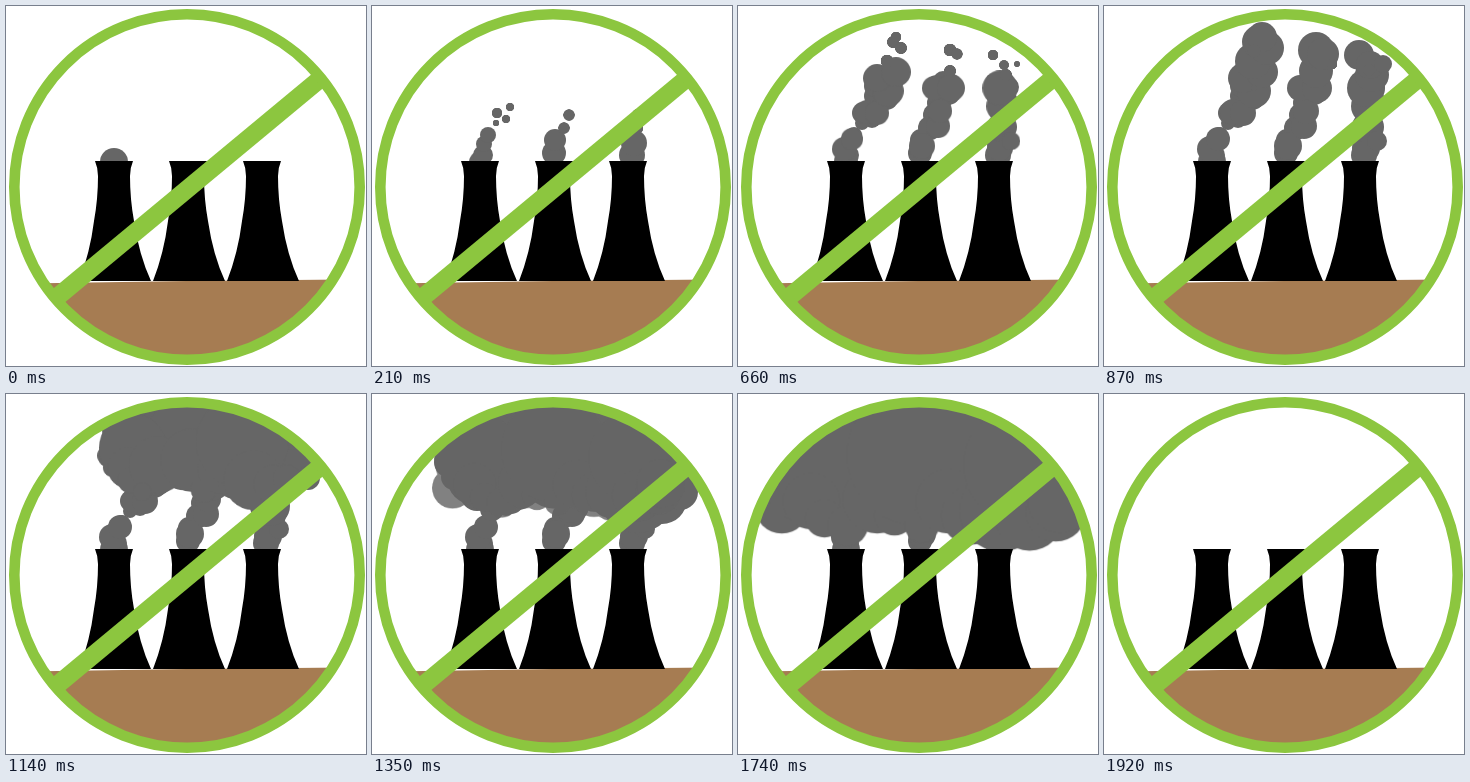
These frames come from a looping animation (360x360 px, 1.95 s). An HTML page without scripts:

```html
<!DOCTYPE html>
<html lang="en">
<head>
<meta charset="utf-8">
<title>No smoke</title>
<style>
  html, body { margin: 0; width: 100%; height: 100%; overflow: hidden; background: #fff; }
  svg { display: block; width: 100vw; height: 100vh; }
  .smoke { fill: #666; animation: clear 1.95s step-end infinite; }
  .smoke circle { transform-box: fill-box; transform-origin: center; }
  .puff { animation: puff 1.95s linear infinite; }
  .a circle { animation: a 1.95s linear infinite; }
  .b circle { animation: b 1.95s linear infinite; }
  .c circle { animation: c 1.95s linear infinite; }
  .d circle { animation: d 1.95s linear infinite; }
  .e circle { animation: e 1.95s linear infinite; }
  .f circle { animation: f 1.95s linear infinite; }
  .g circle { animation: g 1.95s linear infinite; }
  .spread, .fill { transform-origin: 190px 40px; }
  .spread { animation: spread 1.95s linear infinite; }
  .fill { animation: fill 1.95s linear infinite; }

  @keyframes clear { 0% { opacity: 1 } 98.4%, 100% { opacity: 0 } }
  @keyframes puff { 0% { transform: scale(1) } 12%, 23% { transform: scale(.75) } 45%, 100% { transform: scale(1) } }

  /* plumes rise: low, middle, top, then swell */
  @keyframes a { 0%, 1% { transform: scale(0) } 9%, 100% { transform: scale(1) } }
  @keyframes b { 0%, 6% { transform: scale(0) } 16%, 100% { transform: scale(1) } }
  @keyframes c { 0%, 13% { transform: scale(0) } 23%, 100% { transform: scale(1) } }
  @keyframes d { 0%, 20% { transform: scale(0) } 35%, 100% { transform: scale(1) } }
  @keyframes e { 0%, 28% { transform: scale(0) } 44.6%, 100% { transform: scale(1) } }

  /* plumes merge into a cloud */
  @keyframes f { 0%, 43% { transform: scale(0) } 54%, 100% { transform: scale(1) } }
  @keyframes g { 0%, 46% { transform: scale(0) } 58.4%, 100% { transform: scale(1) } }

  /* cloud spreads outward */
  @keyframes spread {
    0%, 58.4% { transform: scale(.77); opacity: 0 }
    58.5% { transform: scale(.77); opacity: 1 }
    69.2%, 100% { transform: scale(1); opacity: 1 }
  }
  @keyframes fill {
    0%, 69.2% { transform: scale(.76); opacity: 0 }
    69.3% { transform: scale(.76); opacity: 1 }
    81.5% { transform: scale(1); opacity: 1 }
    87.7%, 100% { transform: scale(1.015); opacity: 1 }
  }
</style>
</head>
<body>
<svg viewBox="0 0 360 360">
  <defs>
    <clipPath id="inside"><circle cx="181" cy="181" r="171"/></clipPath>
    <path id="tower" d="M89 155H127Q124 162 124 170Q124 193 128 215Q133 249 145 275H73Q84 247 88 215Q92 193 92 170Q92 162 89 155Z"/>
  </defs>

  <g clip-path="url(#inside)">
    <g class="smoke">
      <circle class="puff" cx="108" cy="156" r="14"/>
      <g class="a">
        <circle cx="111" cy="149" r="10"/>
        <circle cx="112" cy="138" r="8"/>
        <circle cx="116" cy="129" r="8"/>
        <circle cx="182" cy="147" r="12"/>
        <circle cx="183" cy="134" r="11"/>
        <circle cx="260" cy="149" r="13"/>
        <circle cx="262" cy="137" r="13"/>
      </g>
      <g class="b">
        <circle cx="125" cy="107" r="11"/>
        <circle cx="134" cy="113" r="9"/>
        <circle cx="124" cy="117" r="7"/>
        <circle cx="138" cy="101" r="9"/>
        <circle cx="192" cy="122" r="12"/>
        <circle cx="197" cy="109" r="12"/>
        <circle cx="265" cy="122" r="13"/>
        <circle cx="266" cy="109" r="13"/>
      </g>
      <g class="c">
        <circle cx="137" cy="90" r="11"/>
        <circle cx="137" cy="80" r="11"/>
        <circle cx="148" cy="91" r="13"/>
        <circle cx="154" cy="76" r="11"/>
        <circle cx="201" cy="97" r="12"/>
        <circle cx="210" cy="86" r="13"/>
        <circle cx="198" cy="78" r="9"/>
        <circle cx="205" cy="75" r="10"/>
        <circle cx="265" cy="96" r="14"/>
        <circle cx="257" cy="80" r="8"/>
        <circle cx="271" cy="81" r="10"/>
      </g>
      <g class="d">
        <circle cx="106" cy="143" r="13"/>
        <circle cx="114" cy="133" r="12"/>
        <circle cx="129" cy="106" r="13"/>
        <circle cx="139" cy="107" r="13"/>
        <circle cx="150" cy="85" r="17"/>
        <circle cx="139" cy="72" r="15"/>
        <circle cx="158" cy="66" r="16"/>
        <circle cx="184" cy="140" r="14"/>
        <circle cx="200" cy="120" r="13"/>
        <circle cx="202" cy="105" r="13"/>
        <circle cx="196" cy="82" r="13"/>
        <circle cx="213" cy="82" r="15"/>
        <circle cx="262" cy="142" r="14"/>
        <circle cx="264" cy="121" r="16"/>
        <circle cx="273" cy="135" r="10"/>
        <circle cx="265" cy="100" r="18"/>
        <circle cx="262" cy="82" r="19"/>
      </g>
      <g class="e">
        <circle cx="149" cy="55" r="18"/>
        <circle cx="155" cy="36" r="17"/>
        <circle cx="163" cy="42" r="17"/>
        <circle cx="158" cy="31" r="15"/>
        <circle cx="212" cy="65" r="17"/>
        <circle cx="212" cy="44" r="18"/>
        <circle cx="219" cy="48" r="16"/>
        <circle cx="268" cy="69" r="17"/>
        <circle cx="255" cy="49" r="15"/>
        <circle cx="266" cy="59" r="14"/>
        <circle cx="279" cy="58" r="9"/>
      </g>
      <g class="f">
        <circle cx="150" cy="45" r="43"/>
        <circle cx="150" cy="82" r="19"/>
        <circle cx="205" cy="86" r="21"/>
        <circle cx="228" cy="58" r="35"/>
        <circle cx="265" cy="64" r="39"/>
        <circle cx="264" cy="112" r="20"/>
      </g>
      <g class="g">
        <circle cx="120" cy="36" r="24"/>
        <circle cx="122" cy="59" r="20"/>
        <circle cx="185" cy="49" r="47"/>
        <circle cx="175" cy="81" r="15"/>
        <circle cx="250" cy="35" r="38"/>
        <circle cx="288" cy="76" r="21"/>
        <circle cx="302" cy="84" r="12"/>
      </g>
      <g class="spread">
        <circle cx="78" cy="68" r="16"/>
        <circle cx="82" cy="83" r="13"/>
        <circle cx="108" cy="58" r="44"/>
        <circle cx="102" cy="84" r="27"/>
        <circle cx="105" cy="100" r="17"/>
        <circle cx="140" cy="80" r="37"/>
        <circle cx="120" cy="115" r="12"/>
        <circle cx="185" cy="74" r="41"/>
        <circle cx="200" cy="112" r="17"/>
        <circle cx="225" cy="85" r="33"/>
        <circle cx="238" cy="105" r="19"/>
        <circle cx="250" cy="50" r="60"/>
        <circle cx="265" cy="100" r="39"/>
        <circle cx="290" cy="105" r="25"/>
        <circle cx="308" cy="98" r="18"/>
      </g>
      <g class="fill">
        <circle cx="46" cy="111" r="27"/>
        <circle cx="80" cy="72" r="58"/>
        <circle cx="75" cy="106" r="28"/>
        <circle cx="88" cy="123" r="19"/>
        <circle cx="111" cy="130" r="20"/>
        <circle cx="140" cy="104" r="34"/>
        <circle cx="157" cy="120" r="20"/>
        <circle cx="180" cy="60" r="70"/>
        <circle cx="184" cy="130" r="17"/>
        <circle cx="210" cy="106" r="32"/>
        <circle cx="232" cy="120" r="29"/>
        <circle cx="262" cy="115" r="41"/>
        <circle cx="285" cy="70" r="60"/>
        <circle cx="290" cy="121" r="34"/>
        <circle cx="316" cy="116" r="30"/>
        <circle cx="320" cy="105" r="32"/>
      </g>
    </g>
    <path fill="#a67c52" d="M20 277.5L180 275L340 273.5V360H20Z"/>
    <use href="#tower"/>
    <use href="#tower" x="74"/>
    <use href="#tower" x="148"/>
  </g>

  <g fill="none" stroke="#8cc63f">
    <path d="M50 292L314 73" stroke-width="18"/>
    <circle cx="181" cy="181" r="172.7" stroke-width="10.6"/>
  </g>
</svg>
</body>
</html>
```
